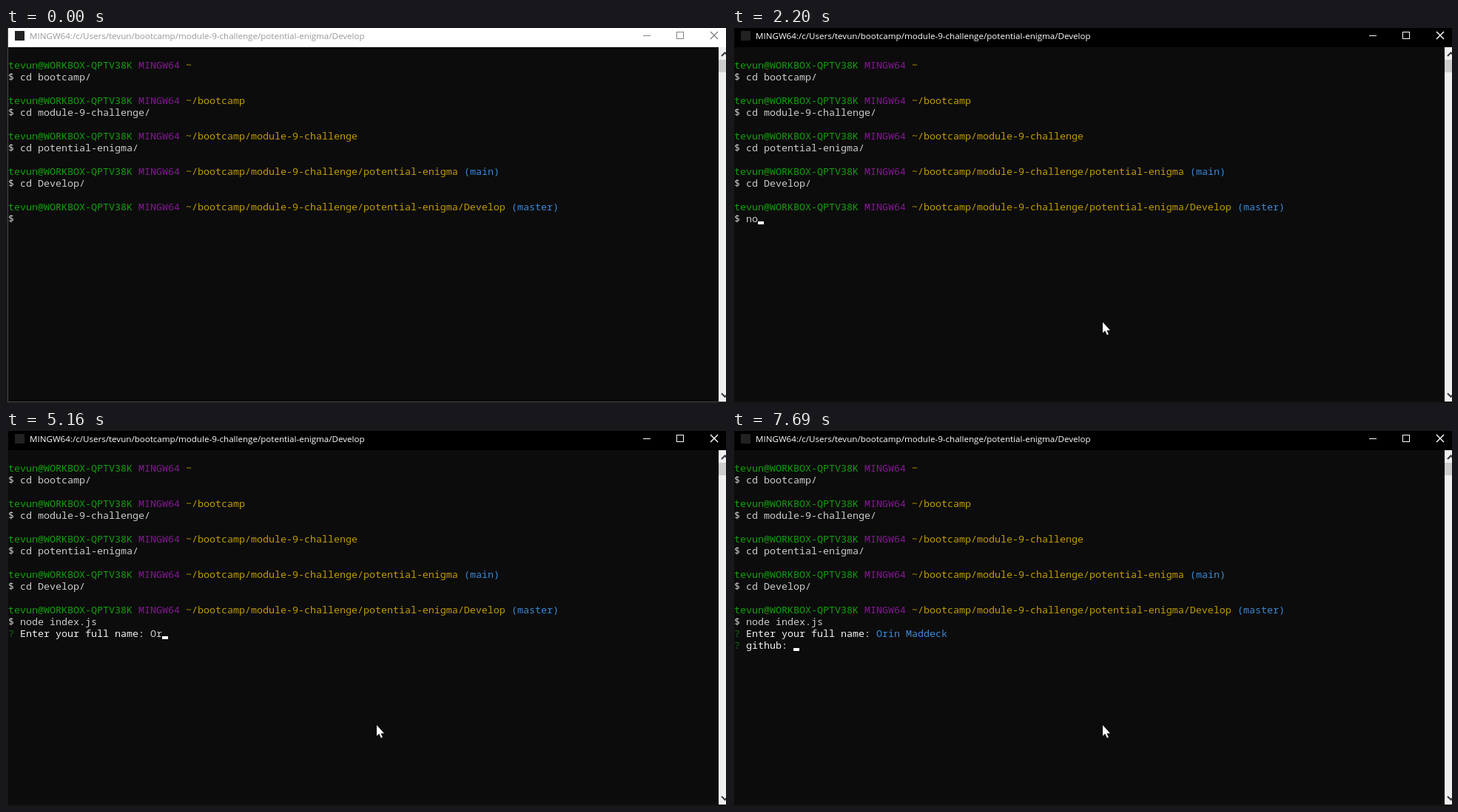
These frames come from a looping animation (973 px wide and 508 px high, 8 s). An HTML page with a canvas:

```html
<!DOCTYPE html>
<html lang="en">
<head>
<meta charset="utf-8">
<title>Terminal session</title>
<style>
  html, body { margin: 0; width: 100%; height: 100%; overflow: hidden; background: #0c0c0c; }
  canvas { display: block; width: 973px; height: 508px; }
</style>
</head>
<body>
<canvas id="stage" width="973" height="508"></canvas>
<script>
const ctx = document.getElementById('stage').getContext('2d');
const LOOP = 8000, TICK = 70, CELL = 8, LINE = 16, LEFT = 3, TOP = 42;
const ENTER = 500, PRESS = 710, ACTIVATE = 780, RELEASE = 850;
const MONO = '13.333px "Noto Sans Mono", monospace';
const SANS = '11.6px "Open Sans", sans-serif';
const C = {
  bg: '#0c0c0c', text: '#cccccc', bright: '#f2f2f2', green: '#13a10e',
  magenta: '#881798', yellow: '#c19c00', blue: '#3a8ad8', mark: '#15661a'
};

const USER = 'tevun', HOST = 'WORKBOX-QPTV38K';
const REPO = 'bootcamp/module-9-challenge/potential-enigma';
const HISTORY = [
  ['', '', 'bootcamp/'],
  ['/bootcamp', '', 'module-9-challenge/'],
  ['/bootcamp/module-9-challenge', '', 'potential-enigma/'],
  ['/' + REPO, '(main)', 'Develop/'],
  ['/' + REPO + '/Develop', '(master)', '']
];
const COMMAND = 'node index.js', NAME = 'Orin Maddeck';
const COMMAND_TIMES = [...Array.from({ length: 9 }, (_, i) => 2130 + TICK * i), 2890, 2960, 3160, 3230];
const NAME_TIMES = [4700, 5160, 5290, 5420, 5550, 5750, 5880, 6080, 6230, 6300, 6430, 6630];
const CARET_OFF = [[0, 1310], [1860, 2130], [4570, 4700], [5950, 6230], [7090, 7690]];
const QUESTION = 'Enter your full name: ';

const typed = (text, times, t) => text.slice(0, times.filter(at => at <= t).length);

function box(color, x, y, w, h) {
  ctx.fillStyle = color;
  ctx.fillRect(x, y, w, h);
}

// Writes colored runs on one row and returns the column after the last.
function write(row, ...runs) {
  let col = 0;
  ctx.font = MONO;
  for (const [text, color] of runs) {
    ctx.fillStyle = color;
    ctx.fillText(text, LEFT + col * CELL, TOP + row * LINE + 13);
    col += text.length;
  }
  return col;
}

function polyline(color, width, ...points) {
  ctx.strokeStyle = color;
  ctx.lineWidth = width;
  ctx.beginPath();
  points.forEach(p => ctx.lineTo(...p));
  ctx.stroke();
}

function drawWindow(active) {
  box(C.bg, 0, 0, 973, 508);
  box('#181818', 0, 0, 2, 508);
  box(active ? '#181818' : '#484848', 2, 0, 1, 507);
  box(active ? '#000000' : '#ffffff', 3, 0, 970, 26);
  box(active ? '#161013' : '#484848', 2, 506, 971, 1);
  box('#181214', 0, 507, 973, 1);
  box('#222222', 12, 4, 13, 13);

  ctx.font = SANS;
  ctx.fillStyle = active ? '#ffffff' : '#999999';
  ctx.fillText(`MINGW64:/c/Users/${USER}/${REPO}/Develop`, 32, 15);

  const icon = active ? '#ffffff' : '#858585';
  polyline(icon, 1, [861, 10.5], [871, 10.5]);
  ctx.strokeRect(906.5, 5.5, 9, 9);
  polyline(icon, 1.4, [952, 5], [962, 15]);
  polyline(icon, 1.4, [962, 5], [952, 15]);

  box('#f0f0f0', 963, 26, 10, 480);
  box('#cdcdcd', 963, 43, 10, 17);
  polyline('#3c3440', 2, [967, 38], [971.5, 33.5], [976, 38]);
  polyline('#3c3440', 2, [967, 495], [971.5, 499.5], [976, 495]);
}

function drawHistory() {
  HISTORY.forEach(([path, branch, folder], i) => {
    write(i * 3, [`${USER}@${HOST} `, C.green], ['MINGW64 ', C.magenta],
      [`~${path} `, C.yellow], [branch, C.blue]);
    if (folder) write(i * 3 + 1, ['$ cd ' + folder, C.text]);
  });
}

function drawSession(t) {
  let row = 13;
  let col = write(row, ['$ ' + typed(COMMAND, COMMAND_TIMES, t), C.text]);
  if (t >= 3560) {
    row = 14;
    col = 0;
  }
  if (t >= 4040) {
    col = write(row, ['? ', C.mark], [QUESTION, C.bright],
      [typed(NAME, NAME_TIMES, t), t < 7090 ? C.text : C.blue]);
  }
  if (t >= 7160) {
    row = 15;
    col = write(row, ['? ', C.mark], ['github: ', C.bright]);
  }
  if (!CARET_OFF.some(([from, to]) => t >= from && t < to)) {
    box('#ffffff', LEFT + col * CELL, TOP + row * LINE + 12, CELL, 4);
  }
}

function drawPointer(t) {
  if (t < ENTER) return;
  // Slides in from the lower right, one position per tick, and stops to click.
  const step = Math.floor((t - ENTER) / TICK) + 1;
  const stops = (PRESS - ENTER) / TICK + 1;
  const left = Math.max(0, 1 - step / stops) ** 2;
  const x = 501 + 400 * left, y = 398.5 + 130 * left;
  const arrow = [[0, 0], [0, 14.5], [3.2, 11.6], [5.8, 17.3], [7.9, 16.4], [5.5, 10.9], [10, 10.9]];
  ctx.fillStyle = '#ffffff';
  ctx.beginPath();
  arrow.forEach(([dx, dy]) => ctx.lineTo(x + dx, y + dy));
  ctx.fill();
  if (t >= PRESS && t < RELEASE) {
    ctx.fillStyle = 'rgba(255, 255, 0, 0.5)';
    ctx.beginPath();
    ctx.arc(500, 397, 12, 0, Math.PI * 2);
    ctx.fill();
  }
}

function draw(t) {
  drawWindow(t >= ACTIVATE);
  drawHistory();
  drawSession(t);
  drawPointer(t);
}

const start = performance.now();
function frame() {
  draw((performance.now() - start) % LOOP);
  requestAnimationFrame(frame);
}
frame();
</script>
</body>
</html>
```
